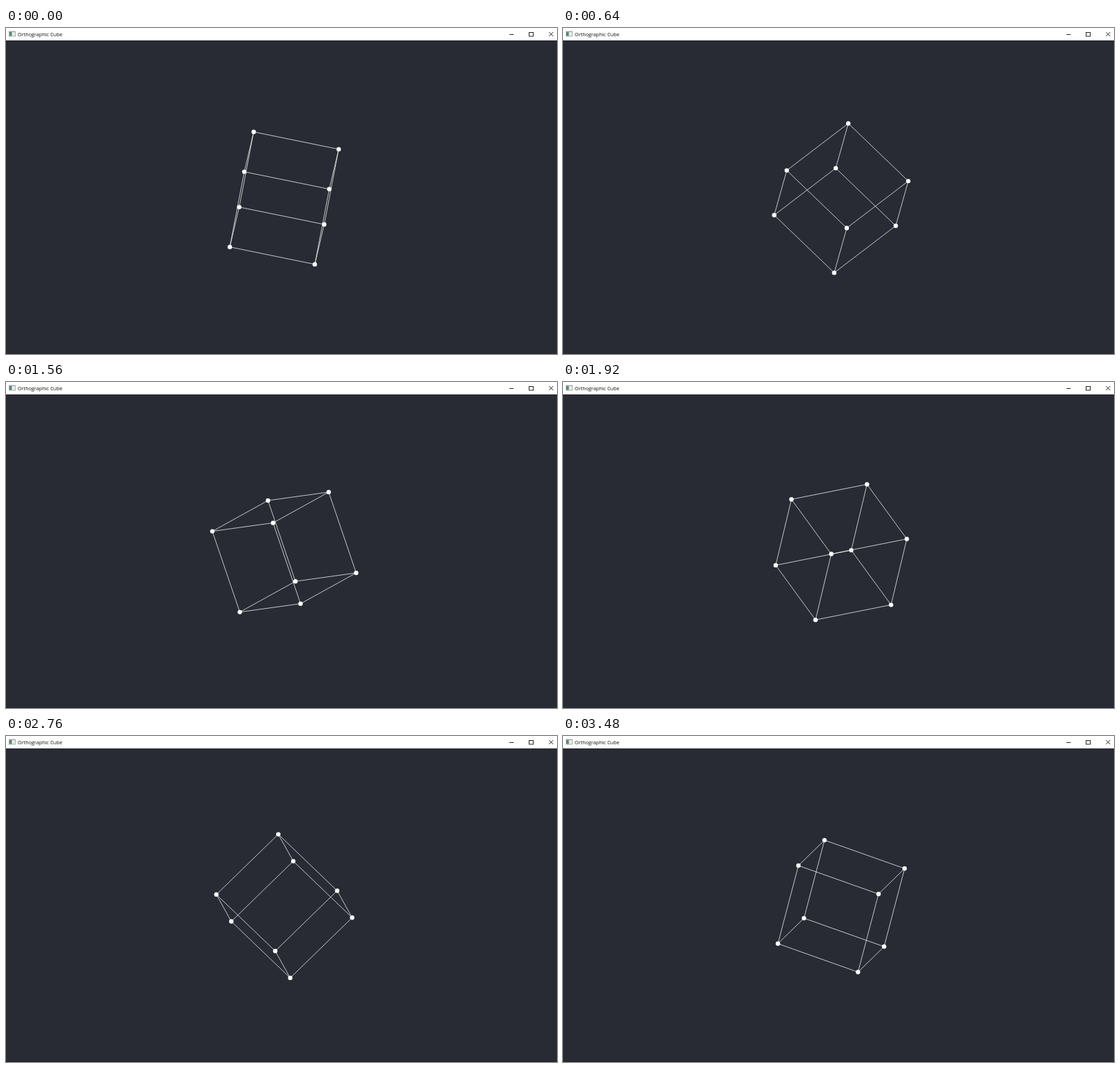
Write an HTML page with a canvas that moves like this. It is 800 px wide and 473 px high and loops after 3.52 s.

```html
<!DOCTYPE html>
<html lang="en">
<head>
<meta charset="utf-8">
<title>Orthographic Cube</title>
<style>
  html, body { margin: 0; width: 100%; height: 100%; overflow: hidden; background: #282b33; }
  canvas { display: block; }
</style>
</head>
<body>
<canvas id="stage" width="800" height="473"></canvas>
<script>
const ctx = document.getElementById('stage').getContext('2d');
const LOOP = 3520, STEP = 40, CENTER = [404, 246.8];

// The cube turns about its (1,1,1) axis. For each edge direction:
// part along the axis, radius around it, starting phase in degrees.
const EDGES = [[-33.5, 91.3, 20], [-13.2, 101.2, -75.4], [63.2, 51, -4.2]];

// Turn in degrees reached at each step; nearly constant speed.
const TURN = [[0, 0], [16, 62.3], [26, 102.4], [39, 153.5], [57, 226.35], [69, 272.6], [87, 345.1]];

const cosDeg = d => Math.cos(d * Math.PI / 180);

function turnAt(step) {
  const i = TURN.findIndex(([s], k) => k > 0 && step <= s);
  const [s0, a0] = TURN[i - 1], [s1, a1] = TURN[i];
  return a0 + (a1 - a0) * (step - s0) / (s1 - s0);
}

function rect(color, x, y, w, h) {
  ctx.fillStyle = color;
  ctx.fillRect(x, y, w, h);
}

function line(x1, y1, x2, y2) {
  ctx.beginPath();
  ctx.moveTo(x1, y1);
  ctx.lineTo(x2, y2);
  ctx.stroke();
}

function drawWindow() {
  rect('#282b33', 0, 0, 800, 473);
  rect('#202227', 0, 472, 800, 1);
  rect('#fff', 0, 0, 800, 18);
  rect('#a4abab', 4, 4.5, 10, 8);
  rect('#e9eeee', 5, 6, 8, 5.5);
  rect('#5b8578', 5, 6, 3.5, 5.5);

  ctx.fillStyle = '#111';
  ctx.font = '7.3px "Open Sans", "Noto Sans", sans-serif';
  ctx.fillText('Orthographic Cube', 17, 11.6);

  ctx.strokeStyle = '#222';
  ctx.lineWidth = 1;
  line(731, 9.5, 737, 9.5);
  ctx.strokeRect(759.5, 6.5, 6, 5.5);
  line(788.5, 6, 794.5, 12);
  line(794.5, 6, 788.5, 12);
}

function drawCube(turn) {
  const dirs = EDGES.map(([along, radius, phase]) => [
    -along + radius * cosDeg(phase + turn - 30),
    along + radius * cosDeg(phase + turn + 30)
  ]);
  const corners = Array.from({ length: 8 }, (_, i) => CENTER.map((c, k) =>
    dirs.reduce((sum, dir, bit) => sum + dir[k] * ((i >> bit & 1) - 0.5), c)));

  ctx.strokeStyle = 'rgba(255,255,255,.82)';
  ctx.lineWidth = 0.9;
  corners.forEach((p, i) => {
    for (const bit of [1, 2, 4]) if (!(i & bit)) line(...p, ...corners[i | bit]);
  });

  ctx.fillStyle = '#fff';
  for (const [x, y] of corners) {
    ctx.beginPath();
    ctx.arc(x, y, 3.2, 0, 2 * Math.PI);
    ctx.fill();
  }
}

function draw(now) {
  drawWindow();
  drawCube(turnAt(Math.floor(now % LOOP / STEP)));
  requestAnimationFrame(draw);
}
draw(0);
</script>
</body>
</html>
```
